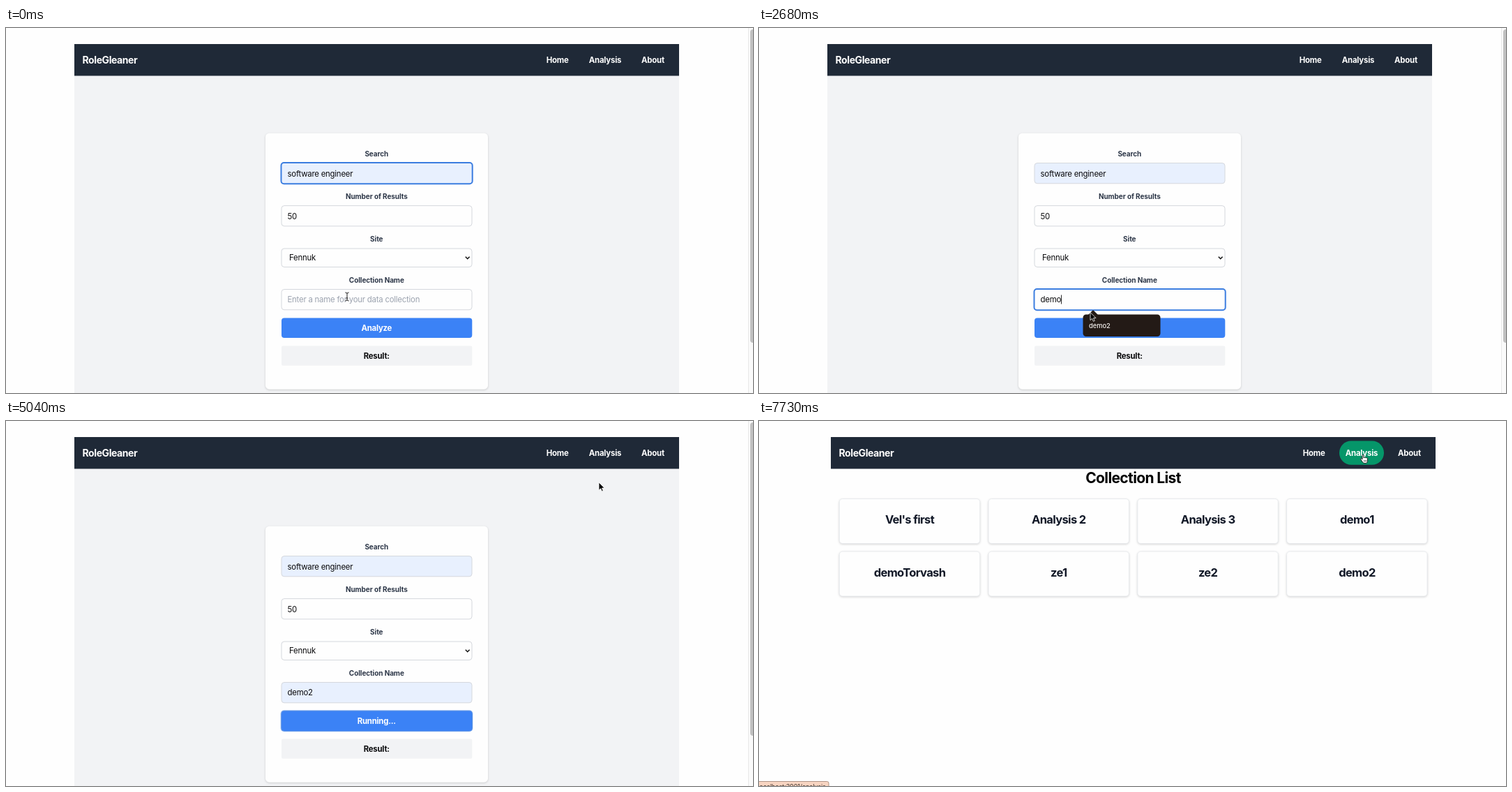
Recreate the animation shown at these times as an HTML page. Size 1071 by 523 pixels, loop 8000 ms.

```html
<!DOCTYPE html>
<html lang="en">
<head>
<meta charset="utf-8">
<title>Job search form</title>
<style>
  html, body { margin: 0; width: 100%; height: 100%; overflow: hidden; background: #fefefe; }
  svg { display: block; width: 1071px; height: 523px; font-family: Inter, "Open Sans", sans-serif; }
  text { white-space: pre; }
  .shadow { filter: drop-shadow(0 1.5px 1.5px rgba(0, 0, 0, .16)); }
</style>
</head>
<body>
<svg id="stage" viewBox="0 0 1071 523"></svg>
<script>
const LOOP = 8000;
const stage = document.getElementById('stage');

const BRAND = 'RoleGleaner';
const BLUE = '#3b82f6', DEEP_BLUE = '#2563eb', RING = '#3b7de0';
const FILLED = '#e8f0fe', DARK = '#1f2937', GREY = '#f2f3f5', POPUP = '#231a16';
const SUGGESTIONS = ["Vel's first", 'demo2', "Vel's First", 'Analysis 2', 'Test1', 'Test2'];
const COLLECTIONS = ["Vel's first", 'Analysis 2', 'Analysis 3', 'demo1', 'demoTorvash', 'ze1', 'ze2', 'demo2'];

// Each table row is [start time, value...]; a row holds until the next one.
const TYPED = [[0, ''], [1190, 'd'], [1340, 'de'], [1490, 'dem'], [1790, 'demo'], [2820, 'demo2']];
const CARET = [[0, false], [150, true], [750, false], [1190, true], [2240, false], [2530, true], [3570, false]];
const FOCUS = [[0, 'search'], [150, 'name'], [3570, 'button']];
const LIST = [[0, 'none'], [150, 'all'], [1190, 'match'], [2820, 'hover'], [2970, 'none']];
const BUTTON = [[0, 'Analyze'], [3570, 'Running...'], [6680, 'Analyze']];
const BUTTON_FILL = [[0, BLUE], [2970, DEEP_BLUE], [4320, BLUE]];
const CURSOR = [
  [0, 'beam', 489, 385], [750, 'beam', 488, 387], [890, 'beam', 488, 386], [1190, 'none', 0, 0],
  [2530, 'beam', 482, 393], [2680, 'arrow', 475, 407.5], [2820, 'arrow', 484, 421],
  [2970, 'hand', 486, 427], [3120, 'hand', 487.5, 429], [3270, 'hand', 488, 429],
  [4170, 'hand', 500, 420], [4320, 'arrow', 556, 367], [4460, 'arrow', 645, 285],
  [4610, 'arrow', 738, 196], [4750, 'arrow', 805, 134], [4900, 'arrow', 840, 101],
  [5040, 'arrow', 850, 88], [5190, 'hand', 862, 57], [5330, 'hand', 866, 55],
  [5480, 'hand', 868, 54], [5630, 'hand', 868, 53.5], [6230, 'hand', 869, 54],
  [6380, 'hand', 868, 53.5], [7130, 'hand', 868, 54.5]
];

const at = (table, t) => table.reduce((found, row) => row[0] <= t ? row : found);

const rect = (x, y, w, h, r, fill, extra = '') =>
  `<rect x="${x}" y="${y}" width="${w}" height="${h}" rx="${r}" fill="${fill}" ${extra}/>`;

// y is the middle of the line
const text = (x, y, str, size, { weight = 400, fill = '#0b0b0d', anchor = 'start', track = -.02, id = '' } = {}) =>
  `<text ${id && `id="${id}"`} x="${x}" y="${y + size * .363}" font-size="${size}" font-weight="${weight}"
    fill="${fill}" text-anchor="${anchor}" letter-spacing="${(track * size).toFixed(3)}">${str}</text>`;

const bold = (x, y, str, size, fill, track = -.02) =>
  text(x, y, str, size, { weight: 700, fill, track, anchor: 'middle' });

const label = (y, str) => bold(531.3, y, str, 10, '#2d3748', -.01);

function field(y, h, fill, focused) {
  const edge = focused ? [394.5, y - .5, 274.2, h + 1, RING, 2] : [395, y, 273, h, '#d5d8dd', 1];
  const [x, top, w, height, color, line] = edge;
  return rect(x, top, w, height, 4, fill, `stroke="${color}" stroke-width="${line}"`);
}

function nav(x, hover) {
  const link = (dx, str) => bold(x + dx, 45.8, str, 11.4, '#fff');
  return rect(x, 23, 867, 45.5, 0, DARK)
    + (hover ? rect(x + 729, 28.5, 64, 34.3, 17.1, '#059669') : '')
    + text(x + 11.5, 45.5, BRAND, 14, { weight: 700, fill: '#fff', track: -.03 })
    + link(692.7, 'Home') + link(761, 'Analysis') + link(829.5, 'About');
}

function popup(mode) {
  if (mode === 'none') return '';
  const item = (y, str) => text(473, y, str, 9.4, { weight: 500, fill: '#f4f0ee', track: -.005 });
  if (mode === 'all')
    return rect(464.5, 207.5, 111, 159.5, 4.5, POPUP)
      + `<path d="M472 366.5h14l-6 6q-1 1-2 0z" fill="${POPUP}"/>`
      + SUGGESTIONS.map((s, i) => item(223.4 + i * 25.65, s)).join('');
  return rect(464.5, 410.5, 111, 31.5, 4.5, POPUP)
    + `<path d="M472 411h14l-6-6q-1-1-2 0z" fill="${POPUP}"/>`
    + (mode === 'hover' ? rect(467.5, 414, 105, 24.5, 3, '#463c38') : '')
    + item(426.4, SUGGESTIONS[1]);
}

function form(t) {
  const focus = at(FOCUS, t)[1], value = at(TYPED, t)[1];
  const done = t >= 6680, extra = done ? 17.1 : 0;
  const button = at(BUTTON, t)[1], fill = at(BUTTON_FILL, t)[1];
  const input = (y, str, x = 403.5) => text(x, y, str, 11.4);
  return `<g transform="translate(0 ${-extra / 2})">`
    + rect(372, 150.7, 319, 367 + extra, 5.5, '#fefefe', 'class="shadow"')
    + label(180.5, 'Search')
    + field(193.5, 29.3, FILLED, focus === 'search') + input(208.5, 'software engineer')
    + label(241.6, 'Number of Results')
    + field(254.6, 29.3, '#fefefe') + input(269.5, '50')
    + label(302.8, 'Site')
    + field(316, 26.5, '#fefefe') + input(329.3, 'Fennuk', 406)
    + '<path d="M658.8 327.8l2.9 2.9 2.9-2.9" fill="none" stroke="#111" stroke-width="1.5"/>'
    + label(361.3, 'Collection Name')
    + field(374.5, 29.3, value === 'demo2' ? FILLED : '#fefefe', focus === 'name')
    + (value
      ? text(403.5, 389.3, value, 11.4, { id: 'typed' })
      : text(403.5, 389.3, 'Enter a name for your data collection', 11.4, { fill: '#9ca3af' }))
    + (at(CARET, t)[1] ? rect(404, 382.5, .9, 13, 0, '#111', 'id="caret"') : '')
    + (focus === 'button' ? rect(393.6, 414.3, 275.8, 31, 5, '#a9c8f7') : '')
    + rect(395, 415.5, 273.3, 28.5, 4, fill)
    + (focus === 'button' ? rect(394.7, 415.3, 273.8, 29, 4, 'none', 'stroke="#4a86e0" stroke-width=".8"') : '')
    + bold(531.3, 429.9, button, 11.4, '#fff')
    + rect(395, 455.5, 273.3, 28.3 + extra, 2, GREY)
    + bold(531.3, 469.7, 'Result:', 11.4, '#0b0b0d')
    + (done ? text(531.3, 486.8, 'Success', 11.4, { anchor: 'middle' }) : '')
    + '</g>';
}

function searchPage(t) {
  return rect(98, 68, 867, 455, 0, GREY) + nav(98, t >= 5190) + form(t) + popup(at(LIST, t)[1])
    + rect(1064, 0, 7, 523, 0, '#fafafa') + rect(1064, 0, 1, 523, 0, '#e8e8e8')
    + rect(1067, 2, 8, 449, 4, '#c1c1c1');
}

function listPage(t) {
  const card = (name, i) => {
    const x = 115.2 + i % 4 * 213.8, y = 111.5 + Math.floor(i / 4) * 75.5;
    return rect(x, y, 201.5, 64, 4.5, '#fefefe', 'stroke="#e5e7eb" stroke-width=".8" class="shadow"')
      + bold(x + 100.8, y + 29.6, name, 16.5, '#111827', -.04);
  };
  return nav(103, true) + bold(536.5, 81.7, 'Collection List', 21, '#000', -.03)
    + (t >= 7730 ? COLLECTIONS.map(card).join('') : '');
}

const statusBar = () =>
  rect(-5, 516.5, 105, 15, 2.5, '#f8d5c2', 'stroke="#a88a7c" stroke-width=".9"')
  + text(-1.5, 523.6, 'localhost:3001/analysis', 9, { fill: '#3d302a', track: -.01 });

const SHAPES = {
  none: '',
  beam: '<path d="M-2.6-6Q0-6 0-4.2Q0-6 2.6-6M0-4.2V4.2M-2.6 6Q0 6 0 4.2Q0 6 2.6 6M-1.3 2H1.3" fill="none" stroke="#222"/>',
  arrow: '<path d="M0 0V11.2L2.6 8.8L4.4 12.8L6.2 12L4.5 8.1H8Z" fill="#000" stroke="#fff" stroke-width=".8"/>',
  hand: '<path d="M-3-5.2a1 1 0 0 1 2 0V-1.6a1 1 0 0 1 1.9-.2a1 1 0 0 1 1.8.4a1 1 0 0 1 1.8.7V2.4C4.5 5 3.5 6 1 6S-2.2 5.2-3.2 3.6L-5.2.4c-.7-1.2.6-2 1.4-1.1L-3 .3Z" fill="#fff" stroke="#111" stroke-width=".9"/><path d="M-.4 1.5V4M1.2 1.5V4M2.8 1.5V4" stroke="#111" stroke-width=".6"/>'
};

function cursor(t) {
  const [, kind, x, y] = at(CURSOR, t);
  return `<g transform="translate(${x} ${y})">${SHAPES[kind]}</g>`;
}

let shown = '';
function render(t) {
  const markup = (t < 7580 ? searchPage(t) : listPage(t)) + (t >= 5480 ? statusBar() : '') + cursor(t);
  if (markup === shown) return;
  stage.innerHTML = shown = markup;
  const caret = document.getElementById('caret'), typed = document.getElementById('typed');
  if (caret && typed) caret.setAttribute('x', 403.6 + typed.getComputedTextLength());
}

const start = performance.now();
function tick() {
  render((performance.now() - start) % LOOP);
  requestAnimationFrame(tick);
}
tick();
</script>
</body>
</html>
```
